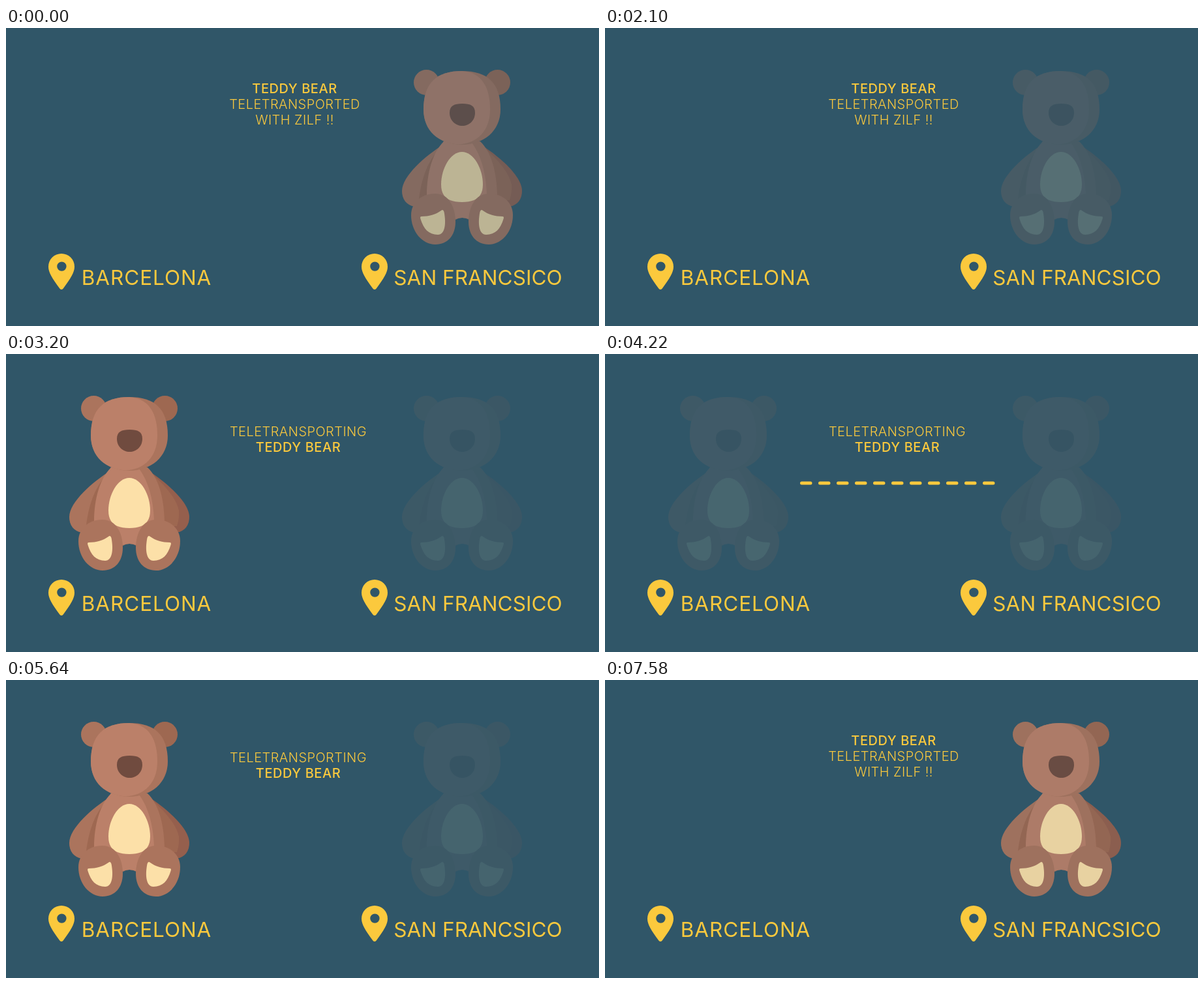
Animation, 909 px wide and 457 px high, one loop 7.72 s. Source, as an HTML page:

```html
<!DOCTYPE html>
<html lang="en">
<head>
<meta charset="utf-8">
<title>Teddy bear teletransport</title>
<style>
  html, body { margin: 0; width: 100%; height: 100%; overflow: hidden; background: #305668; }
  svg { display: block; width: 100vw; height: 100vh; }
  text { font-family: Inter, "Open Sans", sans-serif; fill: #fbc93d; text-anchor: middle; }
  .city { font-size: 31.5px; font-weight: 430; }
  .note { font-size: 20px; font-weight: 340; letter-spacing: .45px; }
  .strong { font-weight: 500; letter-spacing: .55px; }
  .light { fill: #bb8069; }
  .mid { fill: #ab745d; }
  .dark { fill: #9e6851; }
  .deep { fill: #955f4d; }
  .cream { fill: #fce0a8; }
  .nose { fill: #704b3f; }
</style>
</head>
<body>
<svg viewBox="0 0 909 457">
  <defs>
    <g id="leg">
      <path class="mid" d="M148 254C168 254 179 274 179 297C179 318 167 332 148 332C128 332 111 312 111 287C111 267 127 254 148 254z"/>
      <path class="cream" d="M127 289C138 289 149 286 157 280Q160 277 161.500 282C165 300 163 317 152 317C138 317 130 308 125.500 293Q124 289 127 289z"/>
    </g>
    <g id="bear">
      <!-- arms -->
      <path class="mid" d="M160 179C133 196 97 227 97 250C97 266 108 275 122 274L150 262z"/>
      <path class="dark" d="M156 184C137 202 127 230 123 262L140 262L160 184z"/>
      <path class="deep" d="M218 179C245 196 281 227 281 250C281 266 270 275 256 274L230 262z"/>
      <path class="dark" d="M222 182C246 204 261 222 265 240Q266 252 262 264L236 264z"/>
      <!-- body -->
      <path class="mid" d="M160 174L217 174C234 190 243 222 243 260C242 280 225 291 200 294Q189 288 179 294L170 280z"/>
      <path class="light" d="M161 174C143 192 135 224 135 258C140 280 160 291 179 293Q189 289 200 293C218 288 227 272 227 255C226 225 219 196 204 176z"/>
      <path class="cream" d="M189 190C207 190 221 216 221 240C221 260 209 267 189 267C169 267 157 260 157 240C157 216 171 190 189 190z"/>
      <use href="#leg"/>
      <use href="#leg" transform="matrix(-1 0 0 1 378 0)"/>
      <!-- head -->
      <circle class="mid" cx="134.500" cy="83.500" r="19.500"/>
      <circle class="dark" cx="243.500" cy="83.500" r="19.500"/>
      <path class="mid" d="M189 66C228 66 248 84 248 125C248 158 222 179 189 179C156 179 130 158 130 125C130 84 150 66 189 66z"/>
      <path class="light" d="M189 66C220 68 232 92 232 125C232 158 212 177 184 178.500C153 177 130 158 130 125C130 84 150 66 189 66z"/>
      <path class="nose" d="M189.500 116C202 116 209 119 209 130C209 142 200 150 189.500 150C179 150 170 142 170 130C170 119 177 116 189.500 116z"/>
    </g>
    <path id="pin" fill="#fbc93d" fill-rule="evenodd" d="M65 366a20 20 0 0 1 40 0C105 375 99 384 87.700 399.500q-2.700 3-5.400 0C71 384 65 375 65 366zM78.200 365.600a7.200 7.200 0 1 0 14.400 0a7.200 7.200 0 1 0-14.400 0z"/>
    <clipPath id="reveal"><rect id="wipe" x="299" y="190" height="16" width="0"/></clipPath>
  </defs>

  <rect width="909" height="457" fill="#305668"/>
  <use id="left" href="#bear"/>
  <use id="right" href="#bear" x="510"/>

  <use href="#pin"/>
  <use href="#pin" x="480"/>
  <text class="city" x="215.500" y="393.500" letter-spacing=".95">BARCELONA</text>
  <text class="city" x="723.500" y="393.500" letter-spacing=".05">SAN FRANCSICO</text>

  <g id="sending">
    <text class="note" x="448" y="126">TELETRANSPORTING</text>
    <text class="note strong" x="448" y="150">TEDDY BEAR</text>
    <path clip-path="url(#reveal)" d="M301.500 198H596" fill="none" stroke="#fbc93d" stroke-width="5" stroke-linecap="round" stroke-dasharray="13.500 14.500"/>
  </g>
  <g id="arrived">
    <text class="note strong" x="442.500" y="100">TEDDY BEAR</text>
    <text class="note" x="442.500" y="124">TELETRANSPORTED</text>
    <text class="note" x="442.500" y="148">WITH ZILF !!</text>
  </g>
</svg>
<script>
const LOOP = 7720, PHASE = 1220, FAINT = 0.1, LINE = 304;
const SEND = [760, 3200, 5640];
const ARRIVE = [-460, 1980, 4420, 6840];
const $ = id => document.getElementById(id);
const [left, right, wipe, sending, arrived] =
  ['left', 'right', 'wipe', 'sending', 'arrived'].map($);

const cubic = (a, b, u) => 3 * a * u * (1 - u) ** 2 + 3 * b * u * u * (1 - u) + u ** 3;

// cubic-bezier(.25, .1, .25, 1)
function ease(x) {
  if (x >= 1) return 1;
  let lo = 0, hi = 1;
  for (let i = 0; i < 24; i++) {
    const u = (lo + hi) / 2;
    if (cubic(.25, .25, u) < x) lo = u; else hi = u;
  }
  return cubic(.1, 1, lo);
}

const latest = (starts, t) => Math.max(...starts.filter(s => s <= t));

function draw(now) {
  const t = now % LOOP;
  const sent = latest(SEND, t), landed = latest(ARRIVE, t);
  const busy = sent > landed;
  const k = ease((t - (busy ? sent : landed)) / PHASE);

  sending.style.display = busy ? '' : 'none';
  arrived.style.display = busy ? 'none' : '';
  left.style.opacity = busy ? 1 - (1 - FAINT) * k : 0;
  right.style.opacity = busy ? FAINT : FAINT + (1 - FAINT) * k;
  wipe.setAttribute('width', busy ? LINE * k : 0);
}

const start = performance.now();
function tick() {
  draw(performance.now() - start);
  requestAnimationFrame(tick);
}
tick();
</script>
</body>
</html>
```
